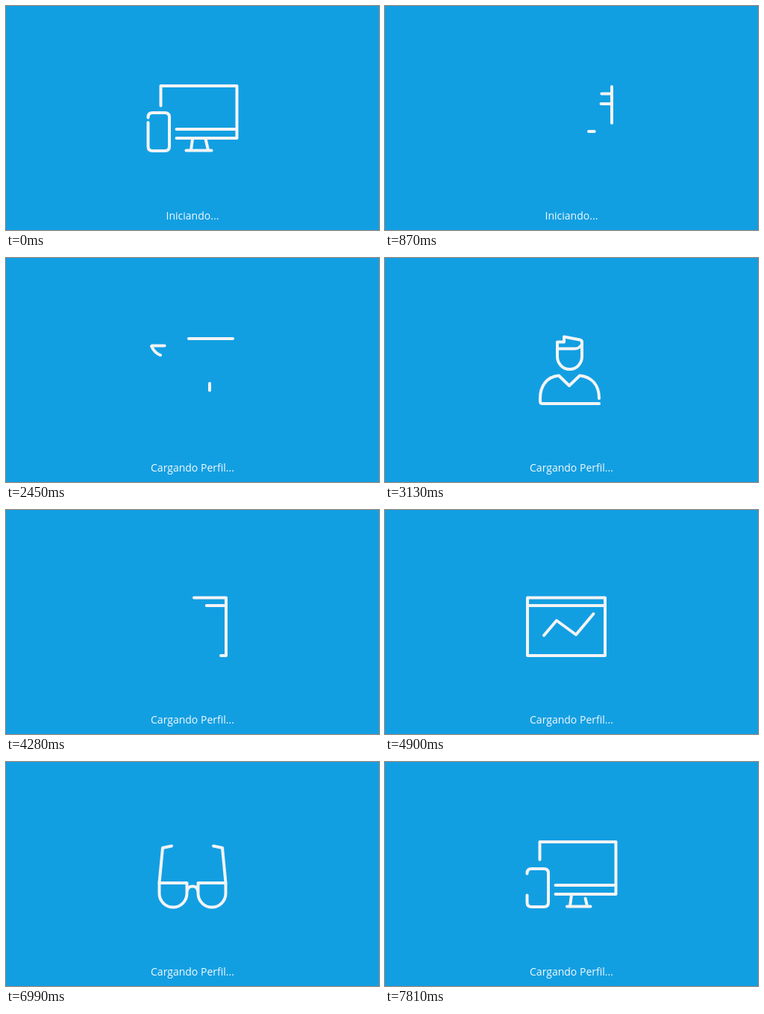
Animation of 500 by 300 pixels, one loop 7.83 s. Source, as an HTML page:

```html
<!DOCTYPE html>
<html lang="es">
<head>
<meta charset="utf-8">
<style>
  html, body { margin: 0; width: 100%; height: 100%; overflow: hidden; background: #129fe2; }
  svg { display: block; width: 500px; height: 300px; }
  path { fill: none; stroke: #f2f4f5; stroke-width: 4; stroke-linecap: round; stroke-linejoin: round; }
  text { font: 14px "Open Sans", sans-serif; fill: #f4f9fc; text-anchor: middle; }
</style>
</head>
<body>
<svg viewBox="0 0 500 300"><text x="250" y="286"></text></svg>
<script>
const LOOP = 7830;
const LABEL_SWITCH = 1320;

// show / hide: when the icon's transition starts; draw / erase: windows in ms after that.
// A line is a path, optionally followed by its own draw and erase windows.
const icons = [
  { show: 6990, hide: 270, draw: [330, 826], erase: [0, 500], lines: [
    ['M228.5 177H309.5V107H207.5V133.5'],
    ['M228.5 165H309', [400, 780]],
    ['M190.5 149.5V149Q190.5 143 196.5 143H213Q219 143 219 149V188Q219 194 213 194H196.5Q190.5 194 190.5 188V156', [400, 900]],
    ['M275.5 193.5H241.5', [500, 846]],
    ['M248 193L250 178', [500, 790]],
    ['M271 193L267.5 178', [500, 970]]
  ] },
  { show: 270, hide: 2070, draw: [500, 1300], erase: [0, 450], lines: [
    ['M304 108V192H191V130C191 117 199 108 211 108Z'],
    ['M304 117.5H196'],
    ['M304 131H213C204 131 198 125 195 118'],
    ['M273 168H291.5V180H273Z']
  ] },
  { show: 2070, hide: 3540, draw: [450, 1060], erase: [0, 400], lines: [
    ['M287 188C287 170 277 159 261 157.5L247 171L233 157.5C217 159 208 171 208 188V192Q208 195 211 195H287'],
    ['M231 122V112.5H240V105.5L261 109.5Q264 110 264 113V132A16.5 17 0 0 1 231 132V122'],
    ['M232 121.5H254Q260 121.5 263 117']
  ] },
  { show: 3540, hide: 5350, draw: [406, 1360], erase: [0, 667], lines: [
    ['M288 195H295V117.5H191V195H288'],
    ['M295 128H191', [672, 946], [0, 320]],
    ['M213 168L230 148L256 167L279.5 139', [800, 1300]]
  ] },
  { show: 5350, hide: 6990, draw: [420, 870], erase: [0, 400], lines: [
    ['M242.5 162V176A18.5 18.5 0 0 1 205.5 176V162H242.5'],
    ['M257.5 162V176A18.5 18.5 0 0 0 294.5 176V162H257.5'],
    ['M243 172Q244 166.5 250 166.5T257 172'],
    ['M205.5 162L210 115L222 112.5'],
    ['M294.5 162L290 115L278 112.5', [420, 930]]
  ] }
];

const svg = document.querySelector('svg');
const label = document.querySelector('text');
const strokes = icons.flatMap(icon => icon.lines.map(([d, draw = icon.draw, erase = icon.erase]) => {
  const el = document.createElementNS('http://www.w3.org/2000/svg', 'path');
  el.setAttribute('d', d);
  el.setAttribute('pathLength', 1);
  svg.append(el);
  return { el, draw, erase, show: icon.show, hide: icon.hide };
}));

const progress = (t, [from, to]) => Math.min(1, Math.max(0, (t - from) / (to - from)));

function paint(t) {
  label.textContent = t < LABEL_SWITCH ? 'Iniciando...' : 'Cargando Perfil...';
  for (const { el, draw, erase, show, hide } of strokes) {
    const wraps = show > hide;
    const leaving = t >= hide && !(wraps && t >= show);
    const head = wraps && t < show ? 1 : progress(t - show, draw);
    const tail = leaving ? progress(t - hide, erase) : 0;
    const visible = head - tail;
    el.style.display = visible > 0.001 ? '' : 'none';
    el.style.strokeDasharray = `${Math.max(visible, 0)} 2`;
    el.style.strokeDashoffset = -tail;
  }
}

const start = performance.now();
function frame() {
  paint((performance.now() - start) % LOOP);
  requestAnimationFrame(frame);
}
frame();
</script>
</body>
</html>
```
